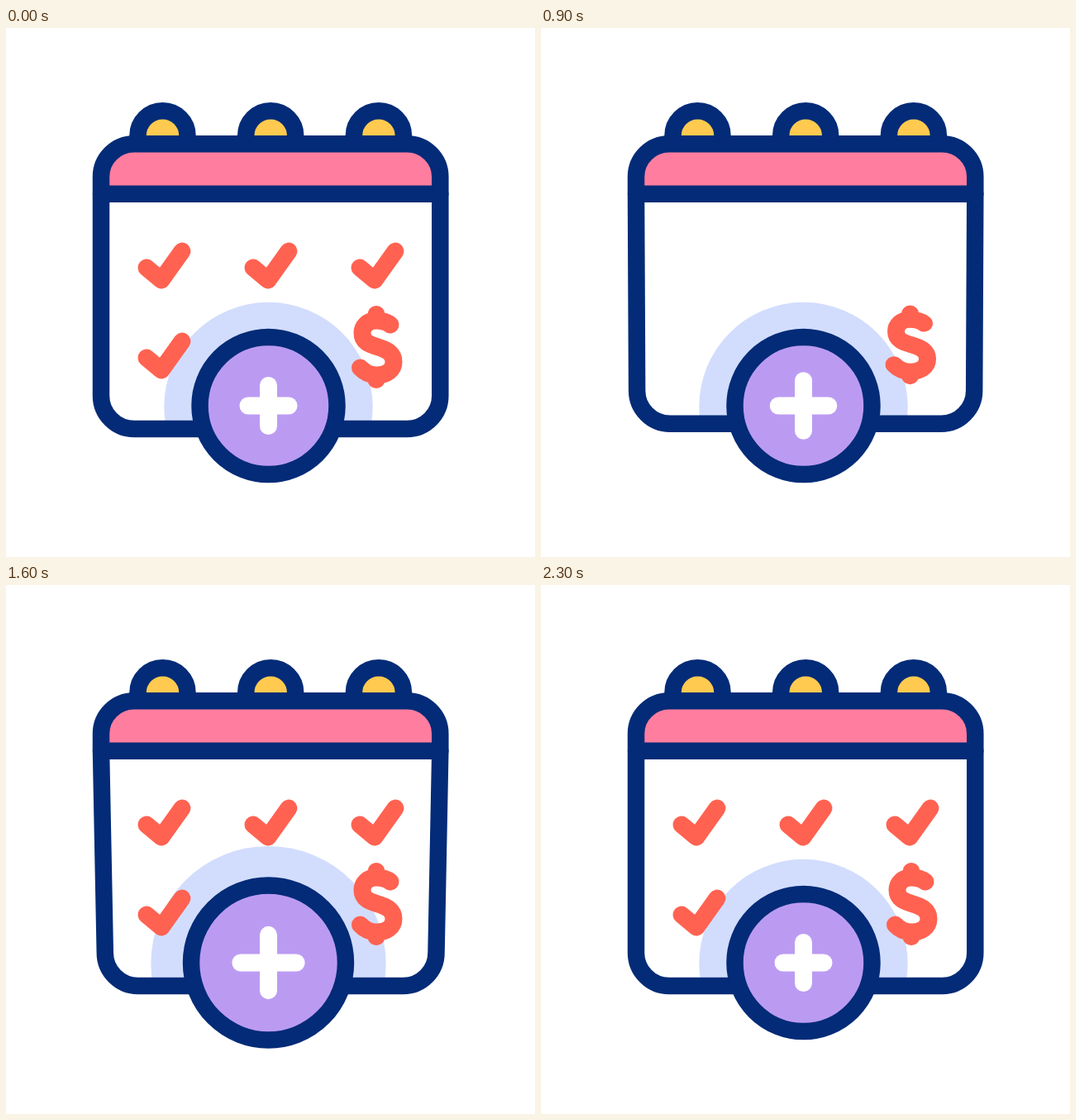
An HTML page with a canvas for the animation above (3.32 s loop, 640 px wide and 640 px high).

```html
<!DOCTYPE html>
<html lang="en">
<head>
<meta charset="utf-8">
<title>Payment calendar</title>
<style>
html, body { margin: 0; width: 100%; height: 100%; overflow: hidden; background: #fff; }
canvas { display: block; width: 100vmin; height: 100vmin; margin: auto; }
</style>
</head>
<body>
<canvas id="stage" width="640" height="640"></canvas>
<script>
const ctx = document.getElementById('stage').getContext('2d');
const LOOP = 3320, STEP = 20;
const NAVY = '#032b77', PINK = '#ff7d9f', YELLOW = '#ffca4f', RED = '#ff6251',
  PURPLE = '#bb9bf2', HALO = '#d2ddfd', WHITE = '#fff';
const LINE = 20.5, MARK = 21;
const CX = 317.5, CY = 457;
const LEFT = 115, RIGHT = 525.3, TOP = 140.3, BAR = 200.8, BOTTOM = 485, CORNER = 40;

const clamp = v => Math.max(0, Math.min(1, v));
const ease = v => (1 - Math.cos(Math.PI * clamp(v))) / 2;

// Turning points [ms, value], eased from one to the next.
const swing = turns => t => turns.slice(1).reduce(
  (v, [time, value], i) => v + (value - turns[i][1]) * ease((t - turns[i][0]) / (time - turns[i][0])),
  turns[0][1]);

const spreadAt = swing([[350, 0], [600, 25], [960, -3], [1380, 9], [1670, -7], [2030, 2], [2290, 0]]);
const liftAt = swing([[325, 0], [600, -30], [1030, 0]]);
const badgeAt = swing([[1000, 1], [1270, 0.95], [1510, 1.18], [1790, 0.95], [2030, 1.06], [2290, 1]]);

function stroke(color, width, path) {
  ctx.strokeStyle = color;
  ctx.lineWidth = width;
  path ? ctx.stroke(path) : ctx.stroke();
}

function disc(x, y, r, color) {
  ctx.beginPath();
  ctx.arc(x, y, r, 0, 2 * Math.PI);
  ctx.fillStyle = color;
  ctx.fill();
}

function segment(x1, y1, x2, y2, color, width) {
  ctx.beginPath();
  ctx.moveTo(x1, y1);
  ctx.lineTo(x2, y2);
  stroke(color, width);
}

function ring(x) {
  const r = 30, y = 130.3;
  ctx.beginPath();
  ctx.moveTo(x - r, TOP);
  ctx.arc(x, y, r, Math.PI, 0);
  ctx.lineTo(x + r, TOP);
  ctx.fillStyle = YELLOW;
  ctx.fill();
  stroke(NAVY, LINE);
}

// The top edge is fixed; the lower edge swings out and lifts.
function pagePath(spread, lift) {
  const bend = clamp(spread / 5);
  const l = LEFT - spread, r = RIGHT + spread - 3 * bend, b = BOTTOM + lift;
  const k = 18, shoulder = 180 + 20 * bend, pull = 158 - 3 * bend;
  const p = new Path2D();
  p.moveTo(LEFT, BAR);
  p.lineTo(LEFT, shoulder);
  p.bezierCurveTo(LEFT, pull, LEFT + k, TOP, LEFT + CORNER, TOP);
  p.lineTo(RIGHT - CORNER, TOP);
  p.bezierCurveTo(RIGHT - k, TOP, RIGHT, pull, RIGHT, shoulder);
  p.lineTo(RIGHT, BAR);
  p.lineTo(r, b - CORNER);
  p.bezierCurveTo(r, b - k, r - k, b, r - CORNER, b);
  p.lineTo(l + CORNER, b);
  p.bezierCurveTo(l + k, b, l, b - k, l, b - CORNER);
  p.closePath();
  return p;
}

function drawPage(page, badge) {
  ctx.fillStyle = WHITE;
  ctx.fill(page);
  ctx.save();
  ctx.clip(page);
  ctx.fillStyle = PINK;
  ctx.fillRect(LEFT, TOP, RIGHT - LEFT, BAR - TOP);
  disc(CX, CY + 1, 126.2 * badge, HALO);
  ctx.restore();
  segment(LEFT, BAR, RIGHT, BAR, NAVY, LINE);
  stroke(NAVY, LINE, page);
}

function check(x, y, part) {
  if (part < 0.01) return;
  const first = Math.hypot(18, 15), second = Math.hypot(25, 35);
  const len = part * (first + second);
  const a = clamp(len / first), b = clamp((len - first) / second);
  ctx.beginPath();
  ctx.moveTo(x, y);
  ctx.lineTo(x + 18 * a, y + 15 * a);
  if (b > 0) ctx.lineTo(x + 18 + 25 * b, y + 15 - 35 * b);
  stroke(RED, MARK);
}

// Checks retract one after another, then draw themselves again.
function checkPart(i, t) {
  return t < 1000
    ? 1 - ease((t - 328 - 40 * i) / 276)
    : ease((t - 1076 - 50 * i) / 175);
}

function drawChecks(t, out) {
  for (let i = 0; i < 4; i++) {
    const row = Math.floor(i / 3);
    check(170 + 129 * (i % 3), 290 + 109 * row - (0.7 + 0.8 * row) * out, checkPart(i, t));
  }
}

const dollar = new Path2D(
  'M465 359C460 355 454 354 448 354C437 354 431 361 431 369' +
  'C431 380 440 383 450 386C460 389 469 393 469 404' +
  'C469 414 460 420 449 420C440 420 433 416 428.5 411' +
  'M448 346.5V354M448 420V425.5');

function drawDollar(out, lift) {
  const x = 449, y = 386;
  ctx.save();
  ctx.translate(x + 0.3 * out + 0.23 * lift, y + 0.42 * lift);
  ctx.scale(1 + 0.005 * out, 1 + 0.01 * out + 0.007 * lift);
  ctx.translate(-x, -y);
  stroke(RED, MARK, dollar);
  ctx.restore();
}

function drawBadge(scale, t) {
  const grown = ease((t - 640) / 360) - ease((t - 1600) / 270);
  const arm = 24.5 + 7 * grown + 17 * (scale - 1) * grown;
  disc(CX, CY, 83 * scale, PURPLE);
  stroke(NAVY, LINE);
  segment(CX - arm, CY, CX + arm, CY, WHITE, MARK);
  segment(CX, CY - arm, CX, CY + arm, WHITE, MARK);
}

function draw(t) {
  const spread = spreadAt(t), lift = liftAt(t), badge = badgeAt(t);
  const out = Math.max(0, spread);

  ctx.fillStyle = WHITE;
  ctx.fillRect(0, 0, 640, 640);
  ctx.lineCap = ctx.lineJoin = 'round';

  for (let i = 0; i < 3; i++) ring(189.5 + 130.7 * i);
  drawPage(pagePath(spread, lift), badge);
  drawChecks(t, out);
  drawDollar(out, lift);
  drawBadge(badge, t);
}

const start = performance.now();
function tick() {
  const t = (performance.now() - start) % LOOP;
  draw(Math.floor(t / STEP) * STEP);
  requestAnimationFrame(tick);
}
tick();
</script>
</body>
</html>
```
